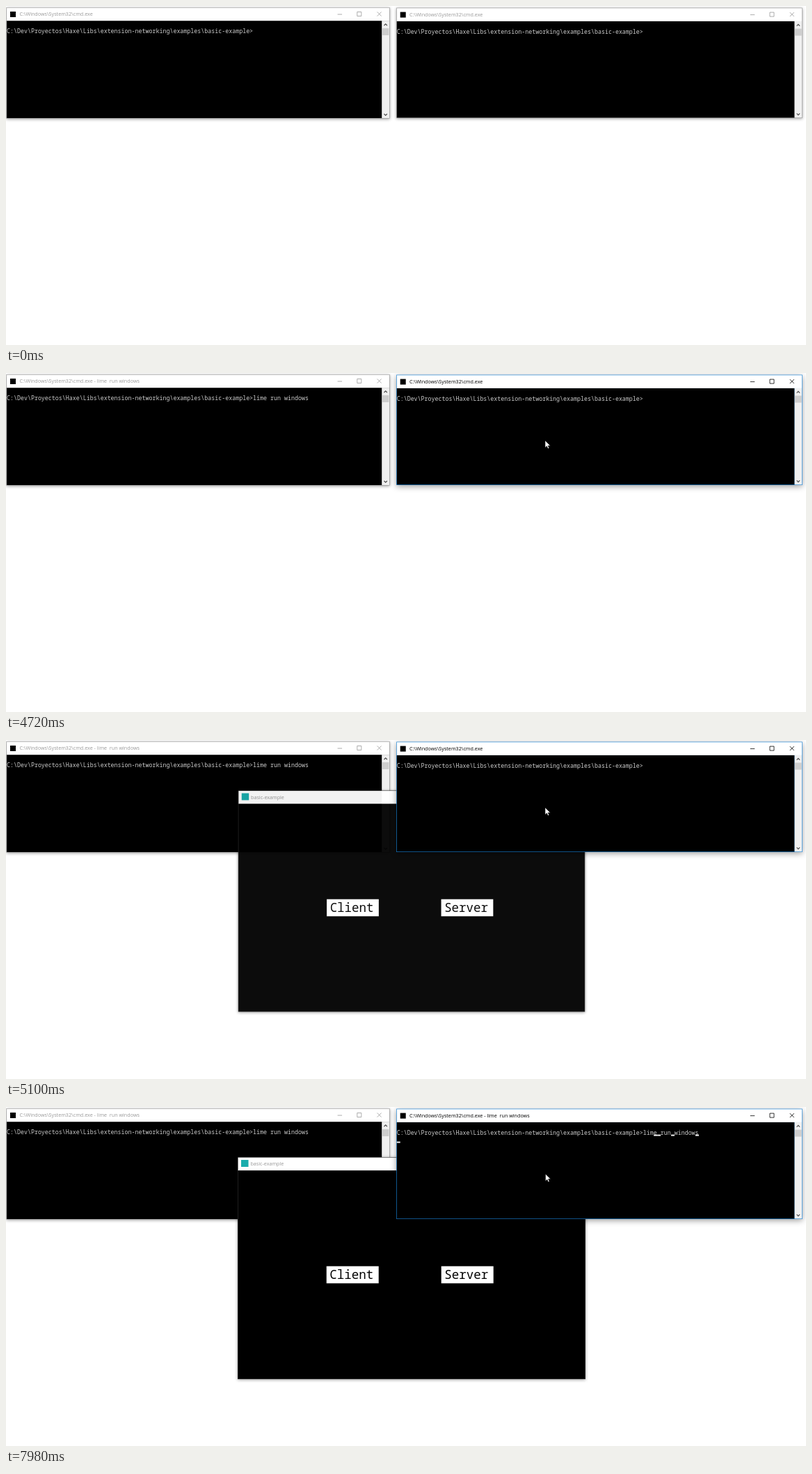
Recreate the animation shown at these times as an HTML page. Size 1150x487 px, loop 8000 ms.

```html
<!DOCTYPE html>
<html lang="en">
<head>
<meta charset="utf-8">
<title>Two consoles</title>
<style>
  html, body { margin: 0; width: 100%; height: 100%; overflow: hidden; background: #fff; }
  svg { display: block; width: 100%; height: 100%; }
  text { white-space: pre; }
  .ui { font: 7.2px "Open Sans", "Noto Sans", sans-serif; }
  .mono { font: 8.32px "Noto Sans Mono", "DejaVu Sans Mono", monospace; fill: #ccc; }
  .label { font: 17.5px "Noto Sans Mono", "DejaVu Sans Mono", monospace; fill: #000; }
  .window { --ink: #999; --edge: #999; --glyph: #999; }
  .window.active { --ink: #000; --edge: #1883d7; --glyph: #000; }
  .window .frame { fill: var(--edge); filter: drop-shadow(0 1px 2px rgba(0,0,0,.4)); }
  .window.active .frame { filter: drop-shadow(0 2px 4px rgba(0,0,0,.4)); }
  .window .ui { fill: var(--ink); }
  .buttons { fill: none; stroke: var(--glyph); stroke-width: .8; }
  .arrows { fill: none; stroke: #505050; stroke-width: 1.3; }
  .app .frame { fill: #333; filter: drop-shadow(0 1px 2px rgba(0,0,0,.4)); }
</style>
</head>
<body>
<svg id="stage" viewBox="0 0 1150 487"></svg>
<script>
const LOOP = 8000;
const PX = .624;          // one desktop pixel on the stage
const CELL = 8 * PX;
const PROMPT = 'C:\\Dev\\Proyectos\\Haxe\\Libs\\extension-networking\\examples\\basic-example>';
const COMMAND = 'lime run windows';
const TITLE = 'C:\\Windows\\System32\\cmd.exe';
const stage = document.getElementById('stage');

function add(parent, tag, attrs = {}, text = '') {
  const node = document.createElementNS('http://www.w3.org/2000/svg', tag);
  for (const key in attrs) node.setAttribute(key, attrs[key]);
  node.textContent = text;
  parent.append(node);
  return node;
}
const box = (parent, x, y, width, height, fill, more) =>
  add(parent, 'rect', { x, y, width, height, fill, ...more });
const write = (parent, x, y, style, text) => add(parent, 'text', { x, y, class: style }, text);
const show = (node, on) => node.setAttribute('visibility', on ? 'visible' : 'hidden');

// traceCols: input columns where the caret leaves a mark behind
function makeConsole(left, top, right, bottom, traceCols) {
  const g = add(stage, 'g', { class: 'window' });
  const bodyTop = top + 31 * PX, bodyHeight = bottom - PX - bodyTop;
  const bar = right - 18 * PX, barMid = bar + 8.5 * PX, mid = top + 10;
  box(g, left, top, right - left, bottom - top, '', { class: 'frame' });
  box(g, left + PX, top + PX, right - left - 2 * PX, 30 * PX, '#fff');
  box(g, left + PX, bodyTop, bar - left - PX, bodyHeight, '#000');
  box(g, bar, bodyTop, 17 * PX, bodyHeight, '#f0f0f0');
  box(g, bar + PX, top + 30, 15 * PX, 10, '#cdcdcd');
  add(g, 'path', { class: 'arrows', d:
    `M${barMid - 2.2} ${top + 26}l2.2-2.2 2.2 2.2M${barMid - 2.2} ${bottom - 6.6}l2.2 2.2 2.2-2.2` });
  add(g, 'path', { class: 'buttons', d:
    `M${right - 75} ${mid}h6.5M${right - 46.8} ${mid - 3.5}h6v6h-6z` +
    `M${right - 18} ${mid - 3.5}l6 6m0-6l-6 6` });
  box(g, left + 5.5, mid - 4, 8, 8, '#000');
  const title = write(g, left + 18.9, top + 12.3, 'ui', TITLE);
  const originX = left + .5;
  const line = write(g, originX, top + 37.3, 'mono', PROMPT);
  const inputX = originX + PROMPT.length * CELL;
  const caretY = top + 37;
  const makeCaret = col => box(g, inputX + col * CELL, caretY, CELL, 2, '#f2f2f2');
  const traces = traceCols.map(col => ({ col, node: makeCaret(col) }));
  const caret = makeCaret(0);

  return ({ active, typed, sent, caretOn }) => {
    g.setAttribute('class', active ? 'window active' : 'window');
    title.textContent = sent ? TITLE + ' - lime  run windows' : TITLE;
    line.textContent = PROMPT + COMMAND.slice(0, typed);
    caret.setAttribute('x', sent ? originX : inputX + typed * CELL);
    caret.setAttribute('y', sent ? caretY + 10 : caretY);
    show(caret, caretOn);
    for (const { col, node } of traces) show(node, col < typed);
  };
}

function makeApp() {
  const g = add(stage, 'g', { class: 'app' });
  box(g, 333, 72, 500, 319, '', { class: 'frame' });
  box(g, 333 + PX, 72 + PX, 500 - 2 * PX, 30 * PX, '#fff');
  box(g, 333 + PX, 91.3, 500 - 2 * PX, 299, '#000');
  box(g, 338, 76, 10.5, 10, '#1aacac');
  write(g, 351.4, 84.4, 'ui', 'basic-example').setAttribute('fill', '#999');
  for (const [x, name] of [[460.7, 'Client'], [625.7, 'Server']]) {
    box(g, x, 228.7, 75, 24.6, '#fff');
    write(g, x + 4.6, 246.8, 'label', name);
  }
  return (scale, opacity) => {
    g.setAttribute('transform', `translate(583 231.5) scale(${scale}) translate(-583 -231.5)`);
    g.setAttribute('opacity', opacity);
  };
}

const drawLeft = makeConsole(.5, 2, 551.6, 161.6, []);
const drawApp = makeApp();
const drawRight = makeConsole(561.2, 2.6, 1144.8, 161, [3, 4, 8, 15]);
const mouse = add(stage, 'path', {
  d: 'M0 0V10.2L2.4 8L4 11.6L5.7 10.9L4.1 7.4H7.4Z',
  fill: '#fff', stroke: '#000', 'stroke-width': .5
});

// Tables of [time, value...]; the last row reached holds.
const leftKeys = [[0, 0], [1910, 1], [2070, 2], [2220, 3], [2380, 4], [2540, 6], [2690, 7], [2850, 8],
  [3090, 10], [3250, 11], [3400, 12], [3470, 13], [3550, 14], [3630, 15], [3790, 16]];
const appSteps = [[0, 1, 0], [4940, .95, .25], [5020, .986, .72], [5100, .997, .95], [5180, 1, 1]];
const at = (table, t) => table.filter(row => row[0] <= t).pop();

function rightTyped(t) {
  if (t < 5330) return 0;
  if (t < 5560) return 1;
  if (t < 6720) return Math.min(9, 2 + Math.floor((t - 5560) / 144.2));
  return Math.min(16, 10 + Math.floor((t - 6720) / 122.8));
}

// Pointer travel sampled in n even steps
function travel(t, start, gap, n, from, to) {
  const k = Math.min(n, Math.max(0, Math.floor((t - start) / gap))) / n;
  const e = k * k * (3 - 2 * k);
  return from.map((v, i) => v + (to[i] - v) * e);
}
function mouseAt(t) {
  if (t >= 7980) return [775.5, 96.2];
  if (t >= 4410) return travel(t, 4332, 77.5, 4, [333, 99], [775, 97]);
  return travel(t, 430, 78, 10, [981, 443], [333, 99]);
}

function draw(t) {
  const sentLeft = t >= 3950, sentRight = t >= 7580;
  const leftActive = t >= 1290 && t < 4720;
  const leftBlink = t < 2340 || (t >= 2870 && t < 3400) || sentLeft;
  drawLeft({ active: leftActive, typed: at(leftKeys, t)[1], sent: sentLeft,
    caretOn: leftActive && t >= 1910 && leftBlink });
  drawRight({ active: t >= 4720, typed: rightTyped(t), sent: sentRight, caretOn: t >= 5330 });
  drawApp(...at(appSteps, t).slice(1));
  show(mouse, t >= 430);
  mouse.setAttribute('transform', `translate(${mouseAt(t)})`);
}

const start = performance.now();
function tick() {
  draw((performance.now() - start) % LOOP);
  requestAnimationFrame(tick);
}
tick();
</script>
</body>
</html>
```
